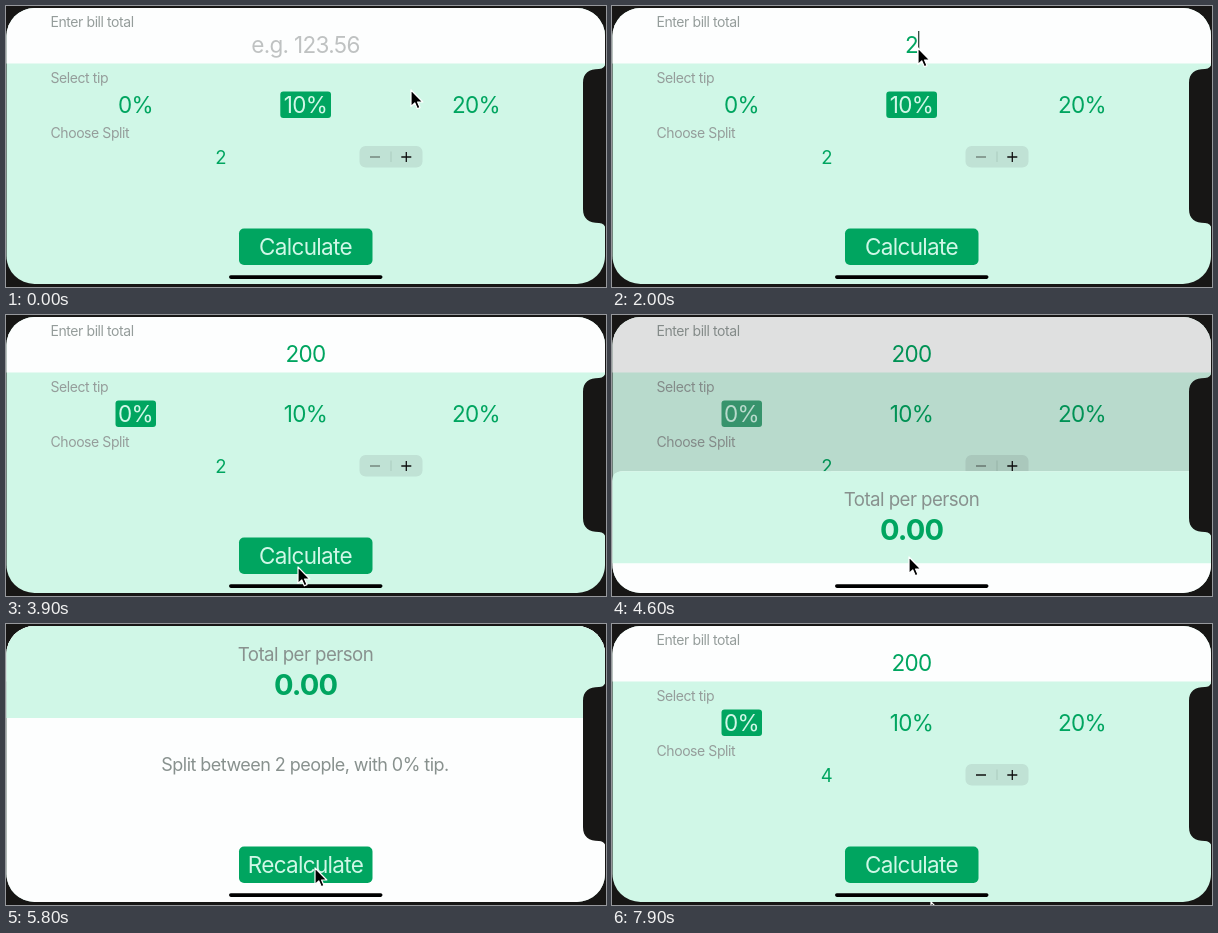
Animation of 600x281 px, one loop 8 s. Source, as an HTML page:

```html
<!DOCTYPE html>
<html lang="en">
<head>
<meta charset="utf-8">
<title>Tip calculator</title>
<style>
  html, body { margin: 0; width: 100%; height: 100%; overflow: hidden; background: #171615; }
  svg { display: block; width: 600px; height: 281px; }
  text { font: 22.5px Inter, Roboto, sans-serif; letter-spacing: -.03em; text-anchor: middle; fill: #00a560; }
  .label { font-size: 14px; text-anchor: start; fill: #959d9b; }
  .note { font-size: 18px; fill: #88918e; }
  .green { fill: #00a560; }
  .mint { fill: #d0f7e7; }
  .white { fill: #fdfefe; }
</style>
</head>
<body>
<svg viewBox="0 0 600 281">
  <clipPath id="screen"><rect x=".5" y="2" width="598.5" height="276" rx="28"/></clipPath>
  <g clip-path="url(#screen)">
    <rect class="mint" width="600" height="281"/>
    <rect class="white" width="600" height="57.5"/>
    <text class="label" x="44.5" y="21">Enter bill total</text>
    <text id="bill" x="299.5" y="47.3"></text>
    <rect id="caret" y="25" width="1.3" height="29" fill="#34483f"/>

    <text class="label" x="44.5" y="76.7">Select tip</text>
    <rect id="chosen" y="85.5" height="26.5" rx="3"/>
    <text class="tip" x="129.5" y="107">0%</text>
    <text class="tip" x="299.5" y="107">10%</text>
    <text class="tip" x="470" y="107">20%</text>

    <text class="label" x="44.5" y="132">Choose Split</text>
    <text id="people" x="214.5" y="158" style="font-size:18.5px"></text>
    <rect x="353.5" y="140" width="63" height="21.5" rx="6" fill="#c0e2d5"/>
    <path d="M385 145.5v10.500" stroke="#aacbbe"/>
    <path id="minus" d="M364 151h10" stroke-width="1.3"/>
    <path d="M395.300 151h10M400.300 146v10" stroke="#111" stroke-width="1.3"/>

    <rect class="green" x="233" y="222.500" width="133.500" height="36.500" rx="5"/>
    <text class="mint" x="299.5" y="249">Calculate</text>

    <rect id="dim" width="600" height="281"/>
    <g id="sheet">
      <rect class="white" width="600" height="300" rx="10"/>
      <path class="mint" d="M0 92V10Q0 0 10 0H590Q600 0 600 10V92Z"/>
      <text class="note" x="299.5" y="35" style="font-size:18.7px">Total per person</text>
      <text x="299.5" y="68.800" style="font-size:29px;font-weight:700">0.00</text>
      <text class="note" x="299" y="145">Split between 2 people, with 0% tip.</text>
      <rect class="green" x="233" y="220.500" width="133.500" height="36.500" rx="5"/>
      <text class="mint" x="299.5" y="247">Recalculate</text>
    </g>
    <rect x="223" y="269.300" width="153.500" height="3.600" rx="1.800"/>
  </g>
  <path fill="#171615" d="M600 56Q599 63 593 63C583 63 577 67 577 77V203C577 213 583 217 593 217Q599 217 600 224Z"/>
  <path id="pointer" d="M0 0V16.500L3.800 13 6.300 18.800 9 17.600 6.600 12H11.800Z" stroke="#fff" stroke-width="1.2" stroke-linejoin="round"/>
</svg>
<script>
const $ = id => document.getElementById(id);
const set = (el, attrs) => { for (const k in attrs) el.setAttribute(k, attrs[k]); };
const tips = [...document.querySelectorAll('.tip')];

// Pointer stops: [time, x, y]
const stops = [
  [0, 405, 84], [100, 405, 84], [800, 306, 42], [2500, 306, 42],
  [3000, 128, 102], [3200, 128, 102], [3800, 292, 252], [4000, 292, 252],
  [4400, 297, 242], [5000, 297, 242], [5600, 309, 244], [6600, 309, 244],
  [7000, 401, 150], [7500, 401, 150], [7900, 319, 278], [8000, 319, 278]
];
// Text entered in the bill field: [time, value]
const edits = [[900, ''], [1900, '2'], [2300, '20'], [2500, '200']];

function pointerAt(t) {
  const i = stops.findIndex(s => s[0] > t);
  const [t0, x0, y0] = stops[i - 1], [t1, x1, y1] = stops[i];
  const u = (t - t0) / (t1 - t0), e = u * u * (3 - 2 * u);
  return [x0 + (x1 - x0) * e, y0 + (y1 - y0) * e];
}

// Critically damped spring, 0 to 1
function spring(ms) {
  const w = Math.max(0, ms) * .01826;
  return 1 - (1 + w) * Math.exp(-w);
}

function draw(t) {
  const [editedAt, value] = edits.filter(e => e[0] <= t).pop() || [0, ''];
  $('bill').textContent = value || 'e.g. 123.56';
  $('bill').style.fill = value ? '' : '#bfc2c2';
  const focused = t >= 900 && t < 3100;
  set($('caret'), {
    x: 299.5 + (value ? $('bill').getComputedTextLength() / 2 : 0),
    opacity: focused && (t - editedAt) % 1000 < 500 ? 1 : 0
  });

  const shown = spring(t - 4518) - spring(t - 5850);
  set($('sheet'), { transform: `translate(0 ${278 - 276 * shown})` });
  set($('dim'), { opacity: .27 * shown });

  const tip = t < 3100 ? 1 : 0;
  tips.forEach((el, i) => el.style.fill = i === tip ? '#d0f7e7' : '');
  set($('chosen'), {
    x: tip ? 274.3 : 109.5, width: tip ? 50.7 : 40.5,
    fill: `rgb(${140 * shown},${165 + 2 * shown},${96 + 59 * shown})`
  });

  const people = 2 + (t >= 7100) + (t >= 7400);
  $('people').textContent = people;
  set($('minus'), { stroke: people > 2 ? '#111' : '#76877f' });

  set($('pointer'), { transform: `translate(${pointerAt(t)})` });
}

function tick() {
  draw(Math.floor(performance.now() % 8000 / 100) * 100);
  requestAnimationFrame(tick);
}
tick();
</script>
</body>
</html>
```
